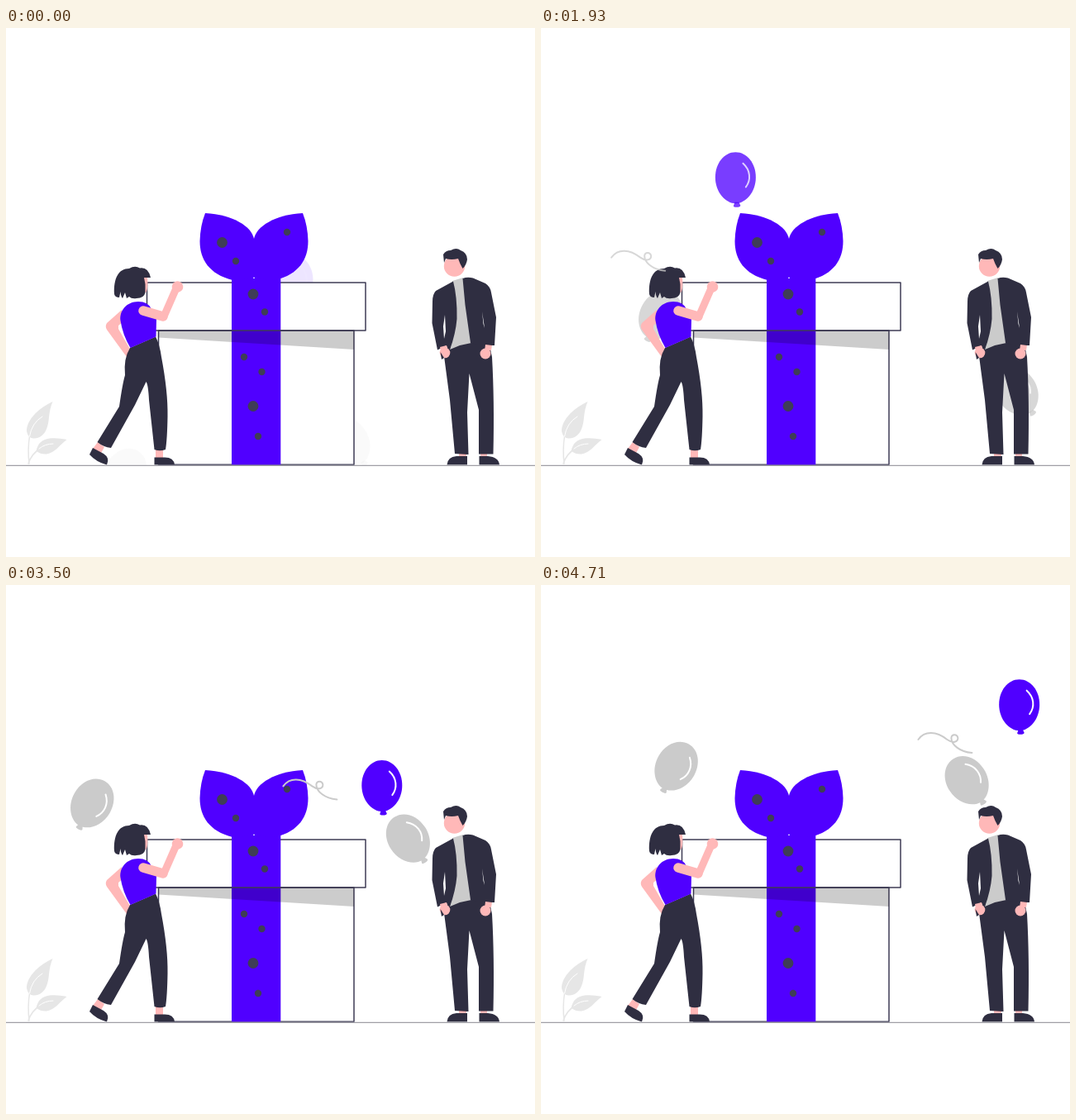
An HTML page with a canvas for the animation above (4780 ms loop, 640x640 px).

```html
<!DOCTYPE html>
<html lang="en">
<head>
<meta charset="utf-8">
<title>Gift and balloons</title>
<style>
  html, body { margin: 0; width: 100%; height: 100%; overflow: hidden; background: #fff; }
  canvas { display: block; width: 100vw; height: 100vh; }
</style>
</head>
<body>
<canvas id="stage" width="640" height="640"></canvas>
<script>
const ctx = document.getElementById('stage').getContext('2d');
const LOOP = 4780, FPS = 14, BEAT = 640, GROUND = 528.8;
const PURPLE = '#5000ff', DARK = '#2f2e41', SLATE = '#3f3d56', SKIN = '#ffb8b8',
      GRAY = '#cbcbcb', LEAF = '#e6e6e6', WHITE = '#fff';

function fill(d, color) {
  ctx.fillStyle = color;
  ctx.fill(new Path2D(d));
}

function line(d, color, width) {
  ctx.strokeStyle = color;
  ctx.lineWidth = width;
  ctx.lineCap = ctx.lineJoin = 'round';
  ctx.stroke(new Path2D(d));
}

function dot(x, y, r, color) {
  ctx.fillStyle = color;
  ctx.beginPath();
  ctx.arc(x, y, r, 0, Math.PI * 2);
  ctx.fill();
}

function placed(x, y, degrees, paint) {
  ctx.save();
  ctx.translate(x, y);
  ctx.rotate(degrees * Math.PI / 180);
  paint();
  ctx.restore();
}

// Flight through waypoints that are one beat apart, as a cardinal spline
function flight(waypoints) {
  const pts = waypoints.split(', ').map(p => p.split(' ').map(Number));
  const last = pts.length - 1;
  const slope = (i, k) => 0.55 * (pts[Math.min(last, i + 1)][k] - pts[Math.max(0, i - 1)][k]);
  return t => {
    const beats = Math.max(0, t - 6) / BEAT;
    const i = Math.min(last - 1, Math.floor(beats)), u = beats - i;
    return [0, 1].map(k => {
      const m = slope(i, k), n = slope(i + 1, k), d = pts[i + 1][k] - pts[i][k];
      return pts[i][k] + u * (m + u * (3 * d - 2 * m - n + u * (m + n - 2 * d)));
    });
  };
}

const mainFlight = flight('347 305, 246 308, 164 247, 235 181, 335 186, 420 231, 492 240, 554 173, 614 103');
const leftFlight = flight('144 538, 72 447, 56 383, 144 347, 191 302, 122 279, 100 246, 144 227, 193 207');
const rightFlight = flight('414 500, 404 448, 470 420, 575 439, 593 359, 517 319, 466 292, 497 252, 545 213');
const stringFlight = flight('190 550, 122 460, 88 370, 85 270, 170 208, 292 221, 376 245, 431 203, 495 140');

function balloon(pos, color, turn) {
  placed(...pos, turn, () => {
    fill('M0 -30.5C14 -30.5 24.5 -17 24.5 0C24.5 18 12 31.5 0 31.5C-12 31.5 -24.5 18 -24.5 0C-24.5 -17 -14 -30.5 0 -30.5Z', color);
    fill('M-1 30H4L6 34Q5.5 36 1.5 36Q-2.5 36 -2.5 34.5Z', color);
    line('M9 -17C18 -9 19 3 12.5 11.5', WHITE, 2);
  });
}

function string(pos) {
  placed(...pos, 0, () =>
    line('M0 8C8 -3 22 -2 35 8C42 13 48 11 48 6C47 1 40.5 1 40 6C40 14 50 23 65 24', GRAY, 2));
}

function plant() {
  line('M28.5 494Q26 510 28 527M42 508Q31 515 27 527', LEAF, 1.5);
  fill('M56.5 452C41 459 25 473 25 488Q27 497 34 496.5C48 496 51 482 52 471Q53 460 56.5 452Z', LEAF);
  fill('M73.5 498C60 495 46 495 40 503Q36 510 37 512Q42 516 49 515.5C60 514 66 503 73.5 498Z', LEAF);
  line('M44 470Q31 478 28.5 494M57 503Q47 503 40 509', WHITE, 1);
}

function panel(x, y, w, h) {
  ctx.fillStyle = WHITE;
  ctx.fillRect(x, y, w, h);
  line(`M${x} ${y}h${w}v${h}h${-w}z`, SLATE, 1.5);
}

function gift() {
  panel(184.5, 366, 236.5, 162.3);
  panel(170.5, 308, 264.5, 58);
  fill('M273 303H332.3V528.5H273Z', PURPLE);
  const petal = 'M241 224C275 226 297 240 300 255V301L299 303L274 305C246 298 234.5 280 234.5 258Q235 239 241 224Z';
  fill(petal, PURPLE);
  ctx.save();
  ctx.translate(600, 0);
  ctx.scale(-1, 1);
  fill(petal, PURPLE);
  ctx.restore();
  fill('M184.5 366H421V389L184.5 374.5Z', 'rgba(0,0,0,.2)');
  line('M184.5 366H421', SLATE, 1.5);
  for (const [x, y] of [[261.5, 259.5], [299, 322], [299, 457.5]]) dot(x, y, 6.4, SLATE);
  for (const [x, y] of [[278, 282], [340, 247], [313, 343.5], [288, 398], [309.5, 416], [305, 494]])
    dot(x, y, 4.2, SLATE);
}

function woman() {
  fill('M140 341L122 357Q119.5 361 122 365L146 398L151 390L136 364V360L143 354Z', SKIN);
  fill('M111 501L119 507L114 516L105 509ZM181 509H190V521H181Z', SKIN);
  fill('M105 508L118 515Q126 520 122 528.5Q109 525 101 516Z', DARK);
  fill('M179.5 528.5V519.5H191Q203 519 204 528.5Z', DARK);
  fill('M150 387L181 373.5Q186 383 188 398Q196 440 195.5 470Q195 498 193 510Q186 512.5 179.5 510L173 450Q172 431 169.5 428L156 456L127 508Q118 507 110.5 501L137 458Q141 430 144 420Q142 400 150 387Z', DARK);
  fill('M138.5 354C137 342 146 331 160 331Q172 331 176 340L182 352L181.5 373.5L150.5 387Q141 371 138.5 354Z', PURPLE);
  line('M166 342L190 349', SKIN, 11.5);
  line('M191 349L205 317', SKIN, 9);
  dot(207.5, 313, 6.8, SKIN);
  fill('M163 301H171Q172 313 170 319L167 321Z', SKIN);
  fill('M131 322C130 303 136 291 149 291Q156 287 162 290.5Q172 289 175 302H167L168.5 310V320Q167 327 158 327Q152 328 149 325L146 327L144 320L141 327Q139 325 138.5 319L137 326Q132 326 131 322Z', DARK);
}

function man() {
  fill('M548 513H557V520H548ZM574 513H582V520H574Z', SKIN);
  fill('M533.5 528.5Q534 519 545 518H558V528.5Z', DARK);
  fill('M572.5 528.5V518H583Q596 519 597 528.5Z', DARK);
  fill('M534 386L566 378L585 384L588 398Q591 450 589.5 515.5H572V462L560.5 418L558 465L559.5 516L543 515L537 450L530 397Z', DARK);
  fill('M540 306L553 302L556 325L563 381L549 384L537 389L544 350Z', GRAY);
  dot(542.5, 288, 12.7, SKIN);
  fill('M530 284L529 274Q532 269 538 269Q545 265 550 269Q558 272 558 280Q557 287 552.5 291Q549 285 547 279Q539 281 532 279Z', DARK);
  fill('M541 306.5L520 318Q516 322 516 331L515.5 357L522 389.5L532 384.5L537 389Q544 370 545.5 352Q546 325 541 306.5Z', DARK);
  fill('M552.5 303Q558 301 565 302.5L580 309Q586 313 587 320L593 350L591 384H580L578 386L562 381L555.5 335Z', DARK);
  fill('M531 347L532 367L530 376L529 361ZM576 343L579 363L577.5 358Z', WHITE);
  fill('M580 383L588 384L587 390L579 391ZM525 386L533 384L535 390L526 391Z', SKIN);
  dot(531, 393, 6.3, SKIN);
  dot(580, 394, 6.5, SKIN);
  fill('M525.5 392L530 399L527 401Z', DARK);
}

function ground() {
  ctx.fillStyle = WHITE;
  ctx.fillRect(0, GROUND, 640, 640 - GROUND);
  ctx.fillStyle = '#88878f';
  ctx.fillRect(0, GROUND, 640, 1);
}

// A short leftover fade, then a steady fade in
function fade(t) {
  return t < 280 ? 0.1 * (1 - t / 280) : Math.min(1, Math.max(0, (t - 500) / 1880));
}

function draw(t) {
  const alpha = fade(t);
  ctx.globalAlpha = 1;
  ctx.fillStyle = WHITE;
  ctx.fillRect(0, 0, 640, 640);
  plant();
  ctx.globalAlpha = alpha;
  balloon(leftFlight(t), GRAY, 30);
  balloon(rightFlight(t), GRAY, -33);
  balloon(mainFlight(t), PURPLE, 0);
  ctx.globalAlpha = 1;
  gift();
  woman();
  man();
  ctx.globalAlpha = alpha;
  string(stringFlight(t));
  ctx.globalAlpha = 1;
  ground();
}

const start = performance.now();
function tick() {
  const ms = (performance.now() - start) % LOOP;
  const step = Math.min(66, Math.floor((ms + 5) * FPS / 1000));
  draw(step * 1000 / FPS);
  requestAnimationFrame(tick);
}
tick();
</script>
</body>
</html>
```
